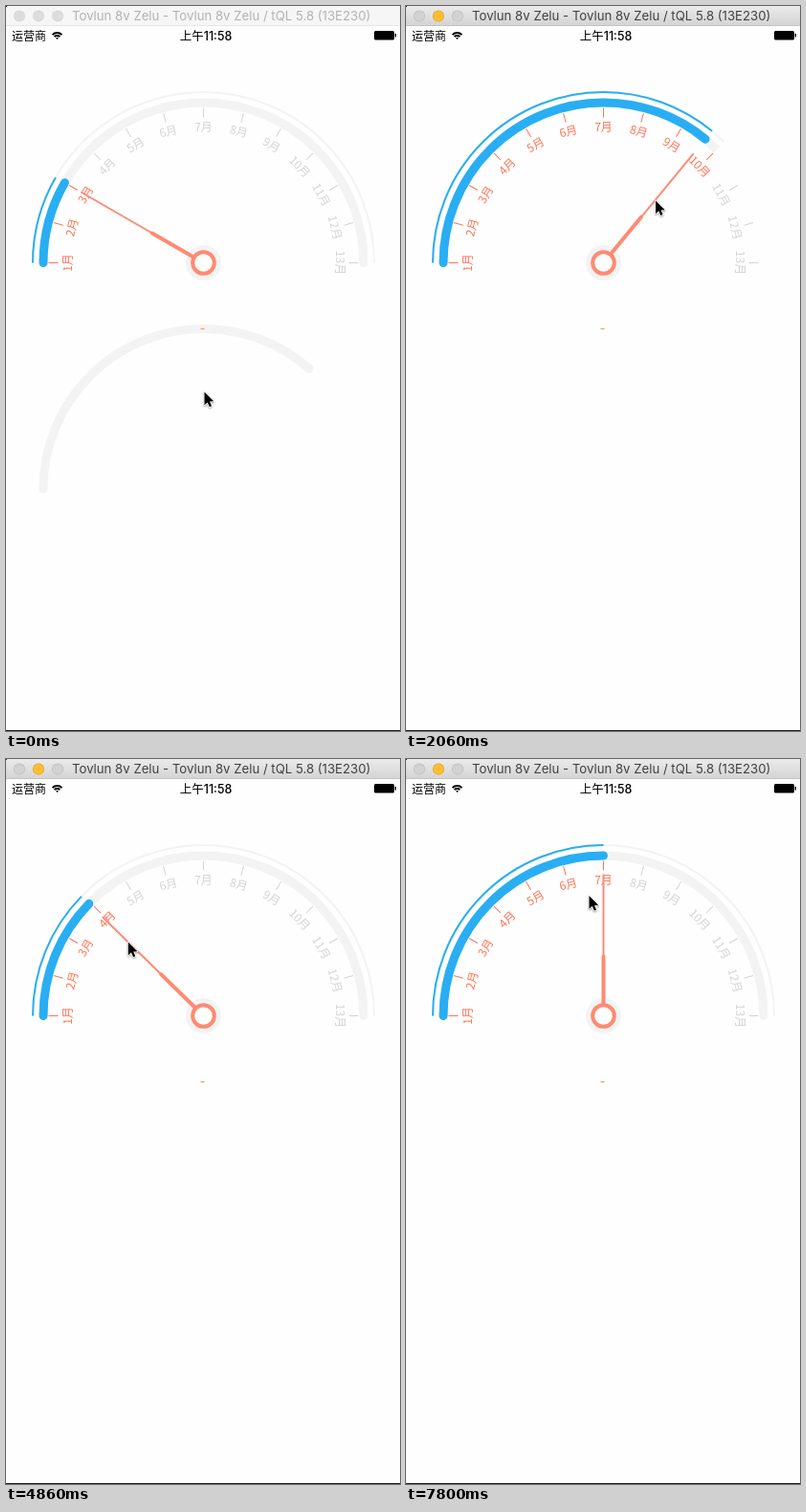
These frames come from a looping animation (412 px wide and 758 px high, 8 s). An HTML page with a canvas:

```html
<!DOCTYPE html>
<html lang="zh">
<head>
<meta charset="utf-8">
<title>Month gauge</title>
<style>
  html, body { margin: 0; width: 100%; height: 100%; overflow: hidden; background: #fefefe; }
  canvas { display: block; }
</style>
</head>
<body>
<canvas id="stage" width="412" height="758"></canvas>
<script>
const ctx = document.getElementById('stage').getContext('2d');
const LOOP = 8000, STEP = 147.2, LAST_STEP = 53, ACTIVATE = 9;
const CX = 206.5, CY = 268.5;
const PAPER = '#fefefe', BLUE = '#29aef3', RED = '#ff7355', NEEDLE = '#ff8a73';
const TRACK = '#f3f3f3', MUTED = '#d4d4d4';
const LATIN = 'Inter, "Noto Sans CJK SC", "Noto Sans CJK", sans-serif';
const CJK = '"Noto Sans CJK SC", "Noto Sans CJK", sans-serif';
const ARROW = new Path2D('M0 0V13.8L3.2 10.9L5.3 15.6L7.5 14.7L5.5 10.1L9.7 9.8Z');

// Turning points of the finger around the hub: step, degrees, distance.
const turns = [
  [8, 34, 100], [14, 129.5, 85], [16, 95, 84], [20, 175.3, 81], [27, 70.6, 61],
  [30, 3, 100], [32, 44.5, 110], [40, 43.6, 117], [43, 75, 110], [49, 4, 105], [53, 83, 127]
];
const isDragging = step => step >= ACTIVATE && step < 36 || step > 40 && step < LAST_STEP;
const mix = (a, b, p) => a + (b - a) * p;

function fingerAt(step) {
  const next = Math.max(1, turns.findIndex(turn => turn[0] >= step));
  const a = turns[next - 1], b = turns[next];
  const p = Math.max(0, (step - a[0]) / (b[0] - a[0]));
  return { angle: mix(a[1], b[1], p), radius: mix(a[2], b[2], p) };
}

// On release the needle settles on the nearest 30 degrees.
function needleAt(step) {
  const { angle } = fingerAt(step);
  return isDragging(step) ? angle : Math.round(angle / 30) * 30;
}

const monthAt = step => Math.round(needleAt(step) / 15);

function pointerAt(step) {
  const { angle, radius } = fingerAt(step), a = angle * Math.PI / 180;
  const x = CX - radius * Math.cos(a), y = CY - radius * Math.sin(a);
  const p = Math.min(1, step / 8);
  return { x: mix(207, x, p) - 45 * Math.sin(Math.PI * p), y: mix(403, y, p) };
}

// After activation the track is revealed only as far as the gauge has been.
function trackEnd(step) {
  if (step < ACTIVATE) return 180;
  let end = 0;
  for (let s = ACTIVATE; s <= step; s++) end = Math.max(end, monthAt(s) * 15);
  return end;
}

function disc(x, y, r, fill) {
  ctx.beginPath();
  ctx.arc(x, y, r, 0, Math.PI * 2);
  ctx.fillStyle = fill;
  ctx.fill();
}

function stroke(width, color, cap = 'butt') {
  ctx.lineWidth = width;
  ctx.lineCap = cap;
  ctx.strokeStyle = color;
  ctx.stroke();
}

function arc(x, y, r, degrees, ...style) {
  ctx.beginPath();
  ctx.arc(x, y, r, Math.PI, Math.PI * (1 + degrees / 180));
  stroke(...style);
}

function line(x1, y1, x2, y2, ...style) {
  ctx.beginPath();
  ctx.moveTo(x1, y1);
  ctx.lineTo(x2, y2);
  stroke(...style);
}

function rect(x, y, w, h, fill) {
  ctx.fillStyle = fill;
  ctx.fillRect(x, y, w, h);
}

function text(str, x, y, font, color, align = 'left') {
  ctx.font = font;
  ctx.fillStyle = color;
  ctx.textAlign = align;
  ctx.fillText(str, x, y);
}

// Draws with "up" pointing from the gauge centre towards the given angle.
function atAngle(degrees, draw) {
  ctx.save();
  ctx.translate(CX, CY);
  ctx.rotate((degrees - 90) * Math.PI / 180);
  draw();
  ctx.restore();
}

function drawTitleBar(active) {
  const shade = ctx.createLinearGradient(0, 0, 0, 21);
  shade.addColorStop(0, active ? '#ebebeb' : '#f6f6f6');
  shade.addColorStop(1, active ? '#d3d3d3' : '#f6f6f6');
  rect(0, 0, 412, 21, shade);
  rect(0, 20, 412, 1, active ? '#c4c4c4' : '#e6e6e6');
  rect(0, 0, 1, 1, '#333');
  for (let i = 0; i < 3; i++) {
    const amber = active && i === 1, x = 14 + 20 * i;
    disc(x, 10.5, 6, amber ? '#e0a22c' : active ? '#bdbdbd' : '#d6d6d6');
    disc(x, 10.5, 5.3, amber ? '#fdbd2e' : active ? '#d2d2d2' : '#dcdcdc');
  }
  text('Tovlun 8v Zelu - Tovlun 8v Zelu / tQL 5.8 (13E230)', 69, 15,
    '13.2px ' + LATIN, active ? '#404040' : '#b2b2b2');
}

function drawStatusBar() {
  text('运营商', 6, 36, '12px ' + CJK, '#000');
  text('上午11:58', 209, 36, '500 12.5px ' + LATIN, '#000', 'center');
  for (let r = 1; r < 9; r += 3) {
    ctx.beginPath();
    ctx.arc(53.5, 35, r, -Math.PI * 0.75, -Math.PI * 0.25);
    stroke(1.9, '#000');
  }
  ctx.beginPath();
  ctx.roundRect(385, 26, 21, 9.5, 1.5);
  ctx.fillStyle = '#000';
  ctx.fill();
  rect(406.7, 29, 1.3, 3.5, '#000');
}

function drawGauge(step) {
  const angle = needleAt(step), month = monthAt(step), end = trackEnd(step);
  arc(CX, CY, 178.5, end, 2, TRACK);
  arc(CX, CY, 167.5, end, 9, TRACK, end < 180 ? 'butt' : 'round');
  arc(CX, CY, 178.5, angle, 2, BLUE);
  arc(CX, CY, 167.5, angle, 9, BLUE, 'round');
  for (let i = 0; i <= 12; i++) {
    const color = i <= month ? RED : MUTED;
    atAngle(i * 15, () => {
      line(0, -162, 0, -152, 1, color);
      text(`${i + 1}月`, 0, -138, '300 12px ' + CJK, color, 'center');
    });
  }
  disc(CX, CY, 18.5, TRACK);
  atAngle(angle, () => {
    line(0, -10, 0, -148, 2, NEEDLE);
    line(0, -10, 0, -62, 4, NEEDLE, 'round');
  });
  disc(CX, CY, 13.3, NEEDLE);
  disc(CX, CY, 9.3, PAPER);
}

function drawPointer({ x, y }) {
  ctx.save();
  ctx.translate(x + 0.5, y + 0.5);
  ctx.lineJoin = 'round';
  ctx.lineWidth = 1.6;
  ctx.strokeStyle = '#fff';
  ctx.shadowColor = 'rgba(0,0,0,.4)';
  ctx.shadowBlur = 2;
  ctx.shadowOffsetY = 1;
  ctx.stroke(ARROW);
  ctx.shadowColor = 'transparent';
  ctx.fillStyle = '#000';
  ctx.fill(ARROW);
  ctx.restore();
}

function render(time) {
  const step = Math.min(LAST_STEP, Math.floor((time % LOOP + 10) / STEP));
  const active = step >= ACTIVATE;
  rect(0, 0, 412, 758, PAPER);
  drawTitleBar(active);
  drawStatusBar();
  if (!active) arc(CX, 505, 167.5, 131.4, 9, TRACK, 'round');
  line(203.5, 337.5, 207.5, 337.5, 1.5, '#f5a860');
  drawGauge(step);
  drawPointer(pointerAt(step));
  rect(0, 757, 412, 1, '#222');
}

let start;
function tick(now) {
  start ??= now;
  render(now - start);
  requestAnimationFrame(tick);
}
requestAnimationFrame(tick);
</script>
</body>
</html>
```
